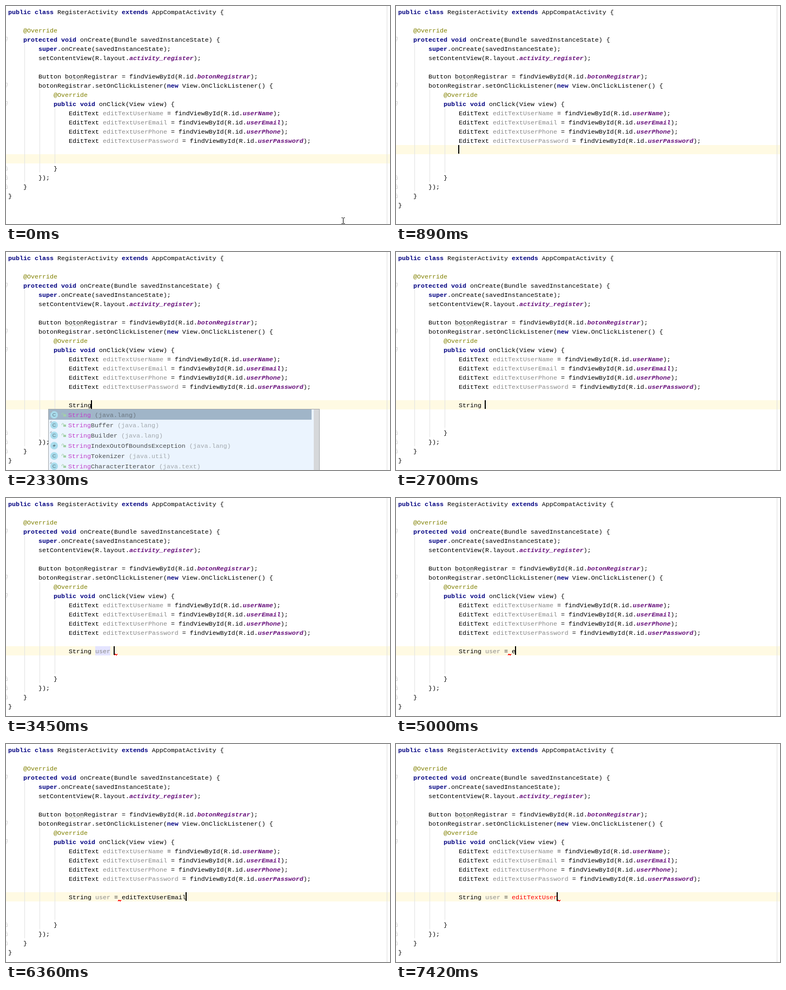
Animation of 710 by 403 pixels, one loop 8 s. Source, as an HTML page:

```html
<!DOCTYPE html>
<html lang="en">
<head>
<meta charset="utf-8">
<title>Code typing</title>
<style>
  html, body { margin: 0; width: 100%; height: 100%; overflow: hidden; background: #fff; }
  svg { display: block; }
  text { font: 11.667px "Courier New", "Liberation Mono", monospace; white-space: pre; fill: #000; }
  .kw { font-weight: bold; fill: #000080; }
  .note { fill: #808000; }
  .field { font-weight: bold; font-style: italic; fill: #660e7a; }
  .dim { fill: #8a8a8a; }
  .bad { fill: #f00; }
  .hit { fill: #c03fcb; }
  .type { text-anchor: end; }
  .popup text { fill: #4a4d50; }
  .popup .type, .popup .dim { fill: #a3a9ae; }
  .popup .picked .type, .popup .picked .dim { fill: #6c7780; }
  .popup .icon { font: 9px "Liberation Sans", Arial, sans-serif; text-anchor: middle; fill: #5f7580; }
  .line { fill: none; stroke-width: 1; }
  #squiggle { shape-rendering: crispEdges; }
</style>
</head>
<body>
<svg id="stage" width="710" height="403" viewBox="0 0 710 403"></svg>
<script>
const LOOP = 8000, CHAR = 7, ROW = 17;
const colX = c => 4 + c * CHAR;
const rowY = r => 2 + r * ROW;

const head = `public class RegisterActivity extends AppCompatActivity {

    @Override
    protected void onCreate(Bundle savedInstanceState) {
        super.onCreate(savedInstanceState);
        setContentView(R.layout.activity_register);

        Button botonRegistrar = findViewById(R.id.botonRegistrar);
        botonRegistrar.setOnClickListener(new View.OnClickListener() {
            @Override
            public void onClick(View view) {
                EditText editTextUserName = findViewById(R.id.userName);
                EditText editTextUserEmail = findViewById(R.id.userEmail);
                EditText editTextUserPhone = findViewById(R.id.userPhone);
                EditText editTextUserPassword = findViewById(R.id.userPassword);`;
const tail = `            }
        });
    }
}`;

const span = (cls, s) => `<tspan class="${cls}">${s}</tspan>`;
const rect = (x, y, w, h, fill, extra = '') =>
  `<rect x="${x}" y="${y}" width="${w}" height="${h}" fill="${fill}" ${extra}/>`;
const line = (d, color, extra = '') => `<path class="line" d="${d}" stroke="${color}" ${extra}/>`;
const wave = (x, y, n) => `M${x} ${y}` + 'l2 -2l2 2'.repeat(n);

const paint = s => s
  .replace(/(R\.\w+\.)(\w+)|\b(public|class|extends|protected|void|super|new)\b|(@\w+)|(editTextUser\w+)(?= =)/g,
    (m, res, field, kw, note, dim) =>
      res ? res + span('field', field) : kw ? span('kw', kw) : note ? span('note', note) : span('dim', dim));

// Leading blanks become an x offset so every row starts on the grid.
const codeRows = (src, first) => src.split('\n').map((s, i) => {
  const indent = s.search(/\S/);
  return indent < 0 ? '' :
    `<text x="${colX(indent)}" y="${rowY(first + i) + 13}">${paint(s.trim())}</text>`;
}).join('');

const fold = (r, dir) => {
  const y = rowY(r) + 8.5;
  return line(`M0 ${y - 4 * dir}h2.5v${5 * dir}l-2.5 ${3 * dir}M0 ${y}h1`, '#d4d4d4');
};

const discs = { C: '#a9dcec', F: '#a9dcec', X: '#a9dcec', V: '#f2dfae', m: '#f5c2cb' };

function icon(kind, x, y) {
  const glyph = kind === 'X'
    ? `<path d="M${x + 2} ${y - 4}l-5 5h3l-2 3l5 -5h-3z" fill="#5f7580"/>`
    : `<text class="icon" x="${x}" y="${y + 3}">${kind === 'F' ? 'C' : kind}</text>`;
  const pin = kind === 'F' ? line(`M${x - 8} ${y - 4}l4 -4M${x - 7} ${y - 7}l3 3`, '#a9b4bc') : '';
  const access = kind === 'V'
    ? `<circle class="line" cx="${x + 16}" cy="${y}" r="2" stroke="#b0b9c0"/>`
    : rect(x + 17, y - 1, 5, 4, '#a3d0a8') + line(`M${x + 14.5} ${y}v-2.5q1.5 -2 3 0v2`, '#a3d0a8');
  return `<circle cx="${x}" cy="${y}" r="7" fill="${discs[kind]}"/>${glyph}${pin}${access}`;
}

function popup(id, x, thumb, items) {
  const rows = items.map(([kind, label, type = ''], i) => {
    const y = 291 + i * 19;
    return `<g class="${i ? '' : 'picked'}">` + icon(kind, x + 11, y + 10) +
      `<text x="${x + 37}" y="${y + 14}">${label}</text>` +
      `<text class="type" x="${x + 480}" y="${y + 14}">${type}</text></g>`;
  }).join('');
  return `<g class="popup" id="${id}">` +
    rect(x, 290, 502, 120, '#a6a9ac') + rect(x + 1, 291, 500, 120, '#ebf4fe') +
    rect(x + 1, 291, 486, 19, '#a0b5c8') +
    rect(x + 491, 291, 10, 120, '#f1f3f5') + rect(x + 491, 291, 10, thumb, '#d6d8da') +
    rows + '</g>';
}

const javaItem = (kind, rest, pkg) => [kind, span('hit', 'String') + rest + span('dim', ` (${pkg})`)];
const viewItem = name => ['V', span('hit', 'ed') + 'itTextUser' + name, 'EditText'];
const extraItem = (verb, args, type) =>
  ['m', `${verb}${span('hit', 'E')}xtra${span('hit', 'D')}ata${span('dim', `(${args})`)}`, type];

const stage = document.getElementById('stage');
stage.innerHTML =
  rect(0, 0, 710, ROW, '#fffae3', 'id="band"') +
  rect(colX(23), rowY(16), 28, ROW, '#e4e4ff', 'id="mark"') +
  line('', '#e2e2e2', 'id="guides"') + line('M704.5 0V403', '#dedede') +
  fold(3, 1) + fold(8, 1) + fold(10, 1) +
  codeRows(head, 0) + line(wave(109, 137, 9), '#c3c6b4') +
  '<g id="tail">' + codeRows(tail, 17) + fold(17, -1) + fold(18, -1) + fold(19, -1) + '</g>' +
  `<text id="typed" x="${colX(16)}" y="${rowY(16) + 13}"></text>` +
  line('M0 290.5l2 -2l2 2l2 -2', '#f00', 'id="squiggle"') +
  rect(0, 0, 2, 16, '#000', 'id="caret"') +
  popup('classes', 78, 112, [
    javaItem('F', '', 'java.lang'),
    javaItem('F', 'Buffer', 'java.lang'),
    javaItem('F', 'Builder', 'java.lang'),
    javaItem('X', 'IndexOutOfBoundsException', 'java.lang'),
    javaItem('C', 'Tokenizer', 'java.util'),
    javaItem('F', 'CharacterIterator', 'java.text')
  ]) +
  popup('members', 176, 28, [
    ...['Email', 'Name', 'Password', 'Phone'].map(viewItem),
    extraItem('put', 'ExtraData extraData', 'void'),
    extraItem('get', 'Class&lt;T> extraDataClass', 'T')
  ]) +
  line('M-3 -5.5h2l1 1l1 -1h2M0 -5v10M-3 5.5h2l1 -1l1 1h2', '#000', 'id="mouse"');

const ui = {};
stage.querySelectorAll('[id]').forEach(e => ui[e.id] = e);

// Each cue changes part of the state at its time.
const cues = [[0, { row: 16, shift: 0, text: '', caret: false, mouse: [623, 397], list: '', squiggle: '', user: '', mark: false, bad: false }]];
const cue = (t, change) => cues.push([t, change]);

// Spreads letters evenly over a span of time.
function type(base, letters, from, to) {
  const step = (to - from) / (letters.length - 1);
  [...letters].forEach((_, i) => cue(from + i * step, { text: base + letters.slice(0, i + 1) }));
}

for (let i = 1; i <= 4; i++)
  cue(60 + (i - 1) * 73.3, { mouse: [623 - 35 * i / 4, 397 - 138 * i / 4] });
cue(420, { mouse: [588, 249] });
cue(500, { row: 14, caret: true });
cue(890, { row: 15, shift: 1, mouse: null });
cue(1180, { row: 16, shift: 2 });
cue(1800, { text: 'S' });
type('S', 'tring', 2030, 2330);
cue(2255, { list: 'classes' });
cue(2700, { text: 'String ', list: '' });
type('String ', 'user', 2930, 3150);
cue(3310, { text: 'String user ' });
cue(3380, { user: 'dim', squiggle: 'end' });
cue(3450, { mark: true });
cue(3680, { text: 'String user =', squiggle: '' });
cue(3755, { text: 'String user = ' });
cue(3830, { squiggle: 'end', mark: false });
cue(4140, { squiggle: 13 });
cue(5000, { text: 'String user = e' });
cue(5220, { text: 'String user = ed', list: 'members' });
cue(5990, { caret: false });
cue(6300, { list: '', caret: true });
const full = 'String user = editTextUserEmail';
cue(6360, { text: full });
[6590, 6750, 6890, 7030, 7270].forEach((t, i) => cue(t, { text: full.slice(0, -1 - i) }));
cue(6750, { squiggle: 'end' });
cue(7420, { bad: true });
cues.sort((a, b) => a[0] - b[0]);

const show = (e, on) => e.setAttribute('visibility', on ? 'visible' : 'hidden');
const move = (e, x, y) => e.setAttribute('transform', `translate(${x} ${y})`);

function render(t) {
  const s = Object.assign({}, ...cues.filter(c => c[0] <= t).map(c => c[1]));
  const len = s.text.length;

  move(ui.band, 0, rowY(s.row));
  move(ui.tail, 0, s.shift * ROW);
  ui.guides.setAttribute('d', [[34, 4, 19], [62, 9, 18], [90, 11, 17]]
    .map(([x, a, b]) => `M${x + .5} ${rowY(a)}V${rowY(b + s.shift)}`).join(''));

  const value = s.text.slice(14);
  ui.typed.innerHTML = s.text.slice(0, 7) + span(s.user, s.text.slice(7, 11)) +
    s.text.slice(11, 14) + span(s.bad ? 'bad' : '', value);

  show(ui.mark, s.mark);
  show(ui.caret, s.caret);
  move(ui.caret, colX(s.row === 14 ? 80 : 16 + len) - 1, rowY(s.row));
  show(ui.squiggle, s.squiggle);
  move(ui.squiggle, colX(16 + (s.squiggle === 'end' ? len : +s.squiggle)), 0);
  show(ui.classes, s.list === 'classes');
  show(ui.members, s.list === 'members');
  show(ui.mouse, s.mouse);
  if (s.mouse) move(ui.mouse, Math.round(s.mouse[0]) + .5, Math.round(s.mouse[1]));
}

const start = performance.now();
function tick() {
  render((performance.now() - start) % LOOP);
  requestAnimationFrame(tick);
}
tick();
</script>
</body>
</html>
```
